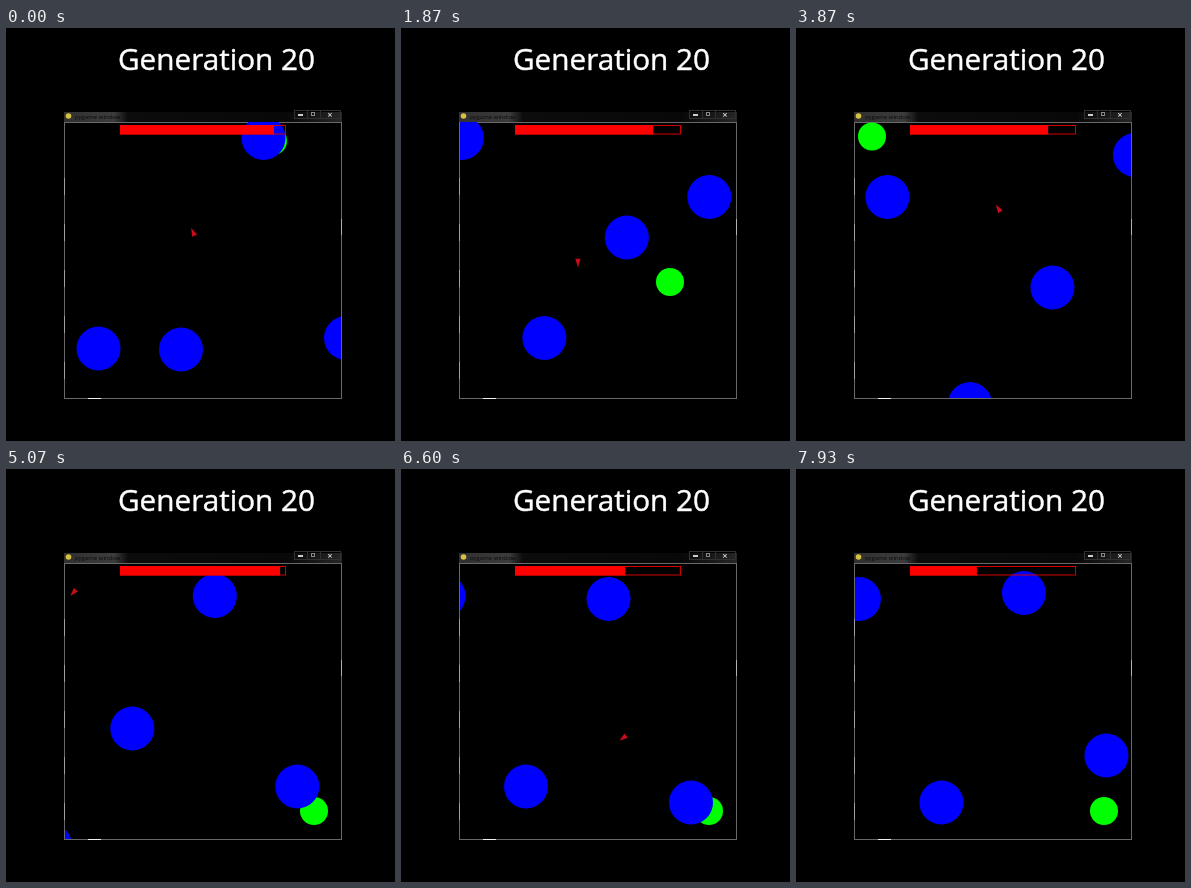
Animation, 389 px wide and 413 px high, one loop 8 s. Source, as an HTML page with a canvas:

```html
<!DOCTYPE html>
<html lang="en">
<head>
<meta charset="utf-8">
<title>Generation 20</title>
<style>
  html, body { margin: 0; width: 100%; height: 100%; overflow: hidden; background: #000; }
  canvas { display: block; width: 389px; height: 413px; }
</style>
</head>
<body>
<canvas id="stage" width="389" height="413"></canvas>
<script>
const ctx = document.getElementById('stage').getContext('2d');

const LOOP = 8000, STEP = 1000 / 15;
const FIELD = { x: 59, y: 95, size: 276 };

// Obstacles travel left in an evenly spaced row, each at its own height.
const ROW = { x: 92.5, spacing: 82.5, speed: 7.23, radius: 22 };
const HEIGHTS = [320.5, 321.5, 110, 310, 209.5, 169, 376, 259.5, 127, 317.5, 130, 333.5, 124, 286.5];

// Each meal refills the bar and moves the food.
const MEALS = [
  { time: -340, x: 267, y: 113 },
  { time: 1040, x: 269, y: 254 },
  { time: 3040, x: 76, y: 108.5 },
  { time: 4915, x: 308, y: 342 }
];
const BAR = { x: 114, y: 97, w: 165, h: 9, decay: 0.0325 };

// Turning points of the ship, unwrapped across the left edge.
const ROUTE = [
  [-600, 300, 240], [0, 187, 204], [1040, 252, 124], [1870, 177, 235], [2620, 256, 265],
  [3070, 210, 279], [3870, 202, 180], [4890, 91, 107], [5070, 67, 124], [6600, -54, 269],
  [7930, -224, 353], [8600, -310, 385]
].map(([time, x, y]) => ({ time, x, y }));

function disc(x, y, r, color) {
  ctx.fillStyle = color;
  ctx.beginPath();
  ctx.arc(x, y, r, 0, 7);
  ctx.fill();
}

function box(x, y, w, h, color) {
  ctx.fillStyle = color;
  ctx.fillRect(x, y, w, h);
}

function outline(x, y, w, h, color) {
  ctx.lineWidth = 1;
  ctx.strokeStyle = color;
  ctx.strokeRect(x + 0.5, y + 0.5, w - 1, h - 1);
}

function label(text, x, y, font, color) {
  ctx.font = font;
  ctx.fillStyle = color;
  ctx.fillText(text, x, y);
}

// Smooth curve through the turning points.
function shipAt(time) {
  const i = ROUTE.findIndex(p => p.time > time) - 1;
  const [before, a, b, after] = [-1, 0, 1, 2].map(n => ROUTE[Math.min(i + n, ROUTE.length - 1)] || ROUTE[0]);
  const span = b.time - a.time, u = (time - a.time) / span, v = 1 - u;
  const along = axis => {
    const leave = (b[axis] - before[axis]) / (b.time - before.time) * span;
    const arrive = (after[axis] - a[axis]) / (after.time - a.time) * span;
    return a[axis] * (1 + 2 * u) * v * v + leave * u * v * v
      + b[axis] * (1 + 2 * v) * u * u - arrive * u * u * v;
  };
  return { x: along('x'), y: along('y') };
}

function drawShip(time) {
  const { x, y } = shipAt(time), last = shipAt(time - 15), next = shipAt(time + 15);
  ctx.save();
  ctx.translate(FIELD.x + (x - FIELD.x + FIELD.size) % FIELD.size, y);
  ctx.rotate(Math.atan2(next.y - last.y, next.x - last.x));
  ctx.fillStyle = '#c80c18';
  ctx.beginPath();
  ctx.moveTo(4.5, 0);
  ctx.lineTo(-4, 2.7);
  ctx.lineTo(-4, -2.7);
  ctx.fill();
  ctx.restore();
}

function drawTitle() {
  label('Generation 20', 112, 42, '29.7px "Open Sans", "Noto Sans", sans-serif', '#fff');
  ctx.strokeStyle = '#fff';
  ctx.lineWidth = 0.45;
  ctx.strokeText('Generation 20', 112, 42);
}

function drawWindow() {
  const bar = ctx.createLinearGradient(58, 0, 336, 0);
  bar.addColorStop(0, '#303030');
  bar.addColorStop(0.18, '#3c3c3c');
  bar.addColorStop(0.23, '#0c0c0c');
  bar.addColorStop(0.8, '#080808');
  bar.addColorStop(1, '#262626');
  box(58, 84, 278, 10, bar);
  disc(62.5, 88, 2.8, '#d8c040');
  label('pygame window', 69, 91, '6px "Open Sans", sans-serif', '#0a0a0a');

  for (const x of [288, 301, 314]) outline(x, 82, x < 314 ? 14 : 21, 9, '#303030');
  box(292, 86, 5, 2, '#ccc');
  outline(305, 84, 4, 4, '#888');
  label('×', 321, 89, 'bold 7px "DejaVu Sans", sans-serif', '#ddd');

  outline(58, 94, 278, 277, '#686868');
  for (let y = 150; y < 370; y += 46) box(58, y, 1, 17, '#a0a0a0');
  box(335, 191, 1, 16, '#b0b0b0');
  box(82, 370, 13, 1, '#f0f0f0');
}

function draw(frame) {
  const time = frame * STEP;
  const meal = MEALS.filter(m => m.time <= time).pop();
  const shift = ROW.speed * Math.max(0, frame - 0.8);

  box(0, 0, 389, 413, '#000');
  drawTitle();
  drawWindow();

  ctx.save();
  ctx.beginPath();
  ctx.rect(FIELD.x, FIELD.y - 1, FIELD.size, FIELD.size);
  ctx.clip();
  disc(meal.x, meal.y, 14, '#0f0');
  HEIGHTS.forEach((y, i) => disc(ROW.x + i * ROW.spacing - shift, y, ROW.radius, '#00f'));
  drawShip(time);
  ctx.restore();

  outline(BAR.x, BAR.y, BAR.w + 1, BAR.h + 0.5, '#d00000');
  box(BAR.x, BAR.y, BAR.w - BAR.decay * (time - meal.time), BAR.h + 0.5, '#f00');
}

const start = performance.now();
function tick(now) {
  const time = Math.max(0, now - start) % LOOP;
  // Frame starts are rounded to whole hundredths of a second.
  draw(Math.floor((Math.floor(time / 10) * 10 + 3.4) / STEP));
  requestAnimationFrame(tick);
}
draw(0);
requestAnimationFrame(tick);
</script>
</body>
</html>
```
